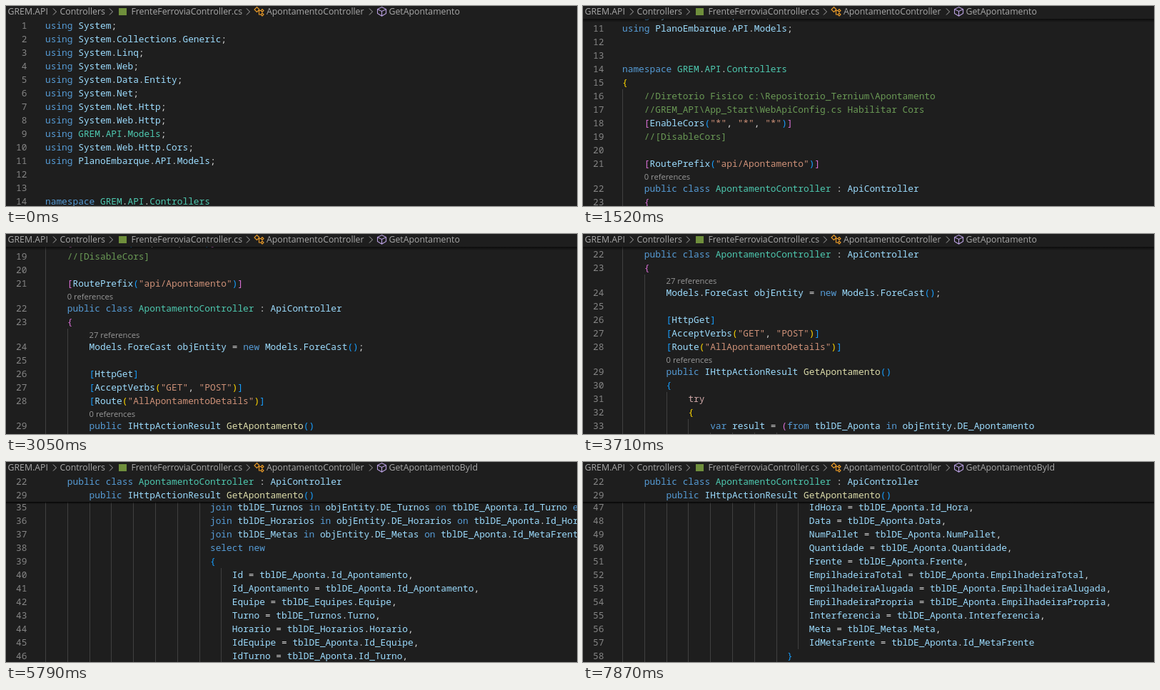
These frames come from a looping animation (800x281 px, 8000 ms). An HTML page with a canvas:

```html
<!DOCTYPE html>
<html lang="pt">
<head>
<meta charset="utf-8">
<title>Code scroll</title>
<style>
html, body { margin: 0; width: 100%; height: 100%; overflow: hidden; background: #1e1e1e; }
canvas { display: block; width: 800px; height: 281px; }
</style>
</head>
<body>
<canvas id="stage" width="800" height="281"></canvas>
<script>
const ctx = document.getElementById('stage').getContext('2d');
const W = 800, H = 281, LOOP = 8000;
const TOP = 18, LINE = 19, LENS = 16, LEFT = 55;
const SIZE = 12.83, CHAR = SIZE * 0.6;
const CODE = '500 ' + SIZE + 'px "Noto Sans Mono", "DejaVu Sans Mono", monospace';
const UI = '12.3px "Open Sans", "Noto Sans", sans-serif';
const SMALL = '11.2px "Open Sans", "Noto Sans", sans-serif';
const BG = '#1e1e1e';
const COLOR = {
  keyword: '#569cd6', name: '#9cdcfe', type: '#4ec9b0', method: '#dcdcaa',
  comment: '#6a9955', string: '#ce9178', flow: '#d0a8a8', plain: '#d4d4d4'
};
const BRACKETS = ['#ffd700', '#da70d6', '#179fff'];

const source = String.raw`using System;
using System.Collections.Generic;
using System.Linq;
using System.Web;
using System.Data.Entity;
using System.Net;
using System.Net.Http;
using System.Web.Http;
using GREM.API.Models;
using System.Web.Http.Cors;
using PlanoEmbarque.API.Models;


namespace GREM.API.Controllers
{
    //Diretorio Fisico c:\Repositorio_Ternium\Apontamento
    //GREM_API\App_Start\WebApiConfig.cs Habilitar Cors
    [EnableCors("*", "*", "*")]
    //[DisableCors]

    [RoutePrefix("api/Apontamento")]
    public class ApontamentoController : ApiController
    {
        Models.ForeCast objEntity = new Models.ForeCast();

        [HttpGet]
        [AcceptVerbs("GET", "POST")]
        [Route("AllApontamentoDetails")]
        public IHttpActionResult GetApontamento()
        {
            try
            {
                var result = (from tblDE_Aponta in objEntity.DE_Apontamento
                              join tblDE_Equipes in objEntity.DE_Equipes on tblDE_Aponta.Id_Apontamento
                              join tblDE_Turnos in objEntity.DE_Turnos on tblDE_Aponta.Id_Turno equals
                              join tblDE_Horarios in objEntity.DE_Horarios on tblDE_Aponta.Id_Horario
                              join tblDE_Metas in objEntity.DE_Metas on tblDE_Aponta.Id_MetaFrente
                              select new
                              {
                                  Id = tblDE_Aponta.Id_Apontamento,
                                  Id_Apontamento = tblDE_Aponta.Id_Apontamento,
                                  Equipe = tblDE_Equipes.Equipe,
                                  Turno = tblDE_Turnos.Turno,
                                  Horario = tblDE_Horarios.Horario,
                                  IdEquipe = tblDE_Aponta.Id_Equipe,
                                  IdTurno = tblDE_Aponta.Id_Turno,
                                  IdHora = tblDE_Aponta.Id_Hora,
                                  Data = tblDE_Aponta.Data,
                                  NumPallet = tblDE_Aponta.NumPallet,
                                  Quantidade = tblDE_Aponta.Quantidade,
                                  Frente = tblDE_Aponta.Frente,
                                  EmpilhadeiraTotal = tblDE_Aponta.EmpilhadeiraTotal,
                                  EmpilhadeiraAlugada = tblDE_Aponta.EmpilhadeiraAlugada,
                                  EmpilhadeiraPropria = tblDE_Aponta.EmpilhadeiraPropria,
                                  Interferencia = tblDE_Aponta.Interferencia,
                                  Meta = tblDE_Metas.Meta,
                                  IdMetaFrente = tblDE_Aponta.Id_MetaFrente
                              }`.split('\n');

const lenses = { 22: '0 references', 24: '27 references', 29: '0 references' };

// Scroll moves one line at each of these times, except where listed in jumps.
const times = [
  70, 200, 330, 460, 590, 920, 1250, 1520, 1730,
  2060, 2220, 2390, 2520, 2690, 2870, 3050,
  3250, 3400, 3560, 3710, 3780, 3900, 4020, 4150, 4270,
  4420, 4520, 4610, 4690, 4820, 4950, 5080, 5200, 5330,
  5480, 5640, 5790, 6010, 6170, 6320, 6480,
  6670, 6840, 7020, 7190, 7370, 7540, 7740, 7870
];
const jumps = { 70: 34, 460: 38, 3900: 0, 4270: 0, 4520: 0, 4690: 0, 4820: 16 };
const MATCH_ON = 4420, MOVED = 4690;

function scrollAt(t) {
  return times.reduce((sum, at) => at <= t ? sum + (jumps[at] ?? LINE) : sum, 0);
}

let depth = 0;
function tokenize(text) {
  const spaceName = /(using|namespace) GREM\./.test(text);
  const pattern = /\/\/.*|"[^"]*"|\w+|[()[\]{}]|[^\s\w]/g;
  return [...text.matchAll(pattern)].map(m => {
    const word = m[0];
    let color = COLOR.plain;
    if (word.startsWith('//')) color = COLOR.comment;
    else if (word[0] === '"') color = COLOR.string;
    else if ('([{'.includes(word)) color = BRACKETS[depth++ % 3];
    else if (')]}'.includes(word)) color = BRACKETS[--depth % 3];
    else if (word === 'try') color = COLOR.flow;
    else if (/^(using|namespace|public|class|new|var|from|in|join|on|equals|select)$/.test(word)) color = COLOR.keyword;
    else if (word === 'GetApontamento') color = COLOR.method;
    else if (spaceName && /\w/.test(word) || word === 'ApontamentoController') color = COLOR.type;
    else if (/\w/.test(word)) color = COLOR.name;
    return { word, color, col: m.index };
  });
}

const indentOf = text => text.search(/\S/);
let offset = 0;
const lines = source.map((text, i) => {
  const number = i + 1;
  if (lenses[number]) offset += LENS;
  const shown = text ? text : source.slice(i).find(Boolean);
  const line = { number, top: offset, indent: indentOf(shown), tokens: tokenize(text), lens: lenses[number] };
  offset += LINE;
  return line;
});

function label(text, x, y, font, color, align = 'left') {
  ctx.font = font;
  ctx.fillStyle = color;
  ctx.textAlign = align;
  ctx.fillText(text, x, y);
}

function drawText(line, y) {
  const base = y + 14;
  label(line.number, 29.5, base, CODE, '#858585', 'right');
  for (const { word, color, col } of line.tokens) label(word, LEFT + col * CHAR, base, CODE, color);
}

function drawLine(line, y, activeCol) {
  const top = line.lens ? y - LENS : y;
  for (let col = 0; col < line.indent; col += 4) {
    ctx.fillStyle = col === activeCol ? '#707070' : '#404040';
    ctx.fillRect(Math.round(LEFT + col * CHAR), top, 1, y + LINE - top);
  }
  if (line.lens) label(line.lens, LEFT + line.indent * CHAR, y - 3, SMALL, '#999999');
  drawText(line, y);
}

function shade(y, height, alpha) {
  const g = ctx.createLinearGradient(0, y, 0, y + height);
  g.addColorStop(0, `rgba(0,0,0,${alpha})`);
  g.addColorStop(1, 'rgba(0,0,0,0)');
  ctx.fillStyle = g;
  ctx.fillRect(0, y, W, height);
}

// Pins the enclosing class and method; returns the bottom of the pinned area.
function drawSticky(scroll) {
  let bottom = TOP;
  for (const number of [22, 29]) {
    const line = lines[number - 1];
    if (TOP + line.top - scroll >= bottom) break;
    ctx.fillStyle = BG;
    ctx.fillRect(0, bottom, W, LINE);
    drawText(line, bottom);
    bottom += LINE;
  }
  return bottom;
}

function stroke(path, color, width = 1) {
  ctx.strokeStyle = color;
  ctx.lineWidth = width;
  ctx.stroke(new Path2D(path));
}

function drawCrumbs(method) {
  const gray = '#a9a9a9';
  ctx.fillStyle = BG;
  ctx.fillRect(0, 0, W, TOP);
  label('GREM.API', 2.5, 12, UI, gray);
  label('Controllers', 75.5, 12, UI, gray);
  label('FrenteFerroviaController.cs', 175.5, 12, UI, gray);
  label('ApontamentoController', 365, 12, UI, gray);
  label(method, 536.5, 12, UI, gray);
  for (const x of [66, 145, 337, 509]) stroke(`M${x} 3.5l4.5 4.5l-4.5 4.5`, gray);
  ctx.fillStyle = '#6f8f3c';
  ctx.fillRect(158, 3, 11, 10);
  stroke('M351.5 1.5l3.5 3.5l-3.5 3.5l-3.5 -3.5z M354 6.5h4 M354.5 6.5v5.5h3.5' +
    ' M359 4.5l2 2l-2 2l-2 -2z M359 10l2 2l-2 2l-2 -2z', '#ee9d28', 1.1);
  stroke('M526.5 1.5l6 3v6l-6 3.5l-6 -3.5v-6z M520.5 4.5l6 3l6 -3 M526.5 7.5v6.5', '#b9a0e0', 1.1);
}

function draw(t) {
  const scroll = scrollAt(t);
  const matched = t >= MATCH_ON && t < MOVED;
  ctx.fillStyle = BG;
  ctx.fillRect(0, 0, W, H);
  for (const line of lines) {
    const y = TOP + line.top - scroll;
    if (y > -LINE && y < H + LENS) drawLine(line, y, matched ? 4 : -1);
  }
  if (matched) {
    ctx.strokeStyle = '#888888';
    ctx.lineWidth = 1;
    ctx.strokeRect(117.5, TOP + lines[29].top - scroll + 0.5, 7, LINE - 1);
  }
  const bottom = drawSticky(scroll);
  if (bottom > TOP) shade(bottom, 3, 0.9);
  else if (scroll) shade(TOP, 5, 0.6);
  drawCrumbs(t < MOVED ? 'GetApontamento' : 'GetApontamentoById');
}

const start = performance.now();
function tick() {
  draw((performance.now() - start) % LOOP);
  requestAnimationFrame(tick);
}
tick();
</script>
</body>
</html>
```
